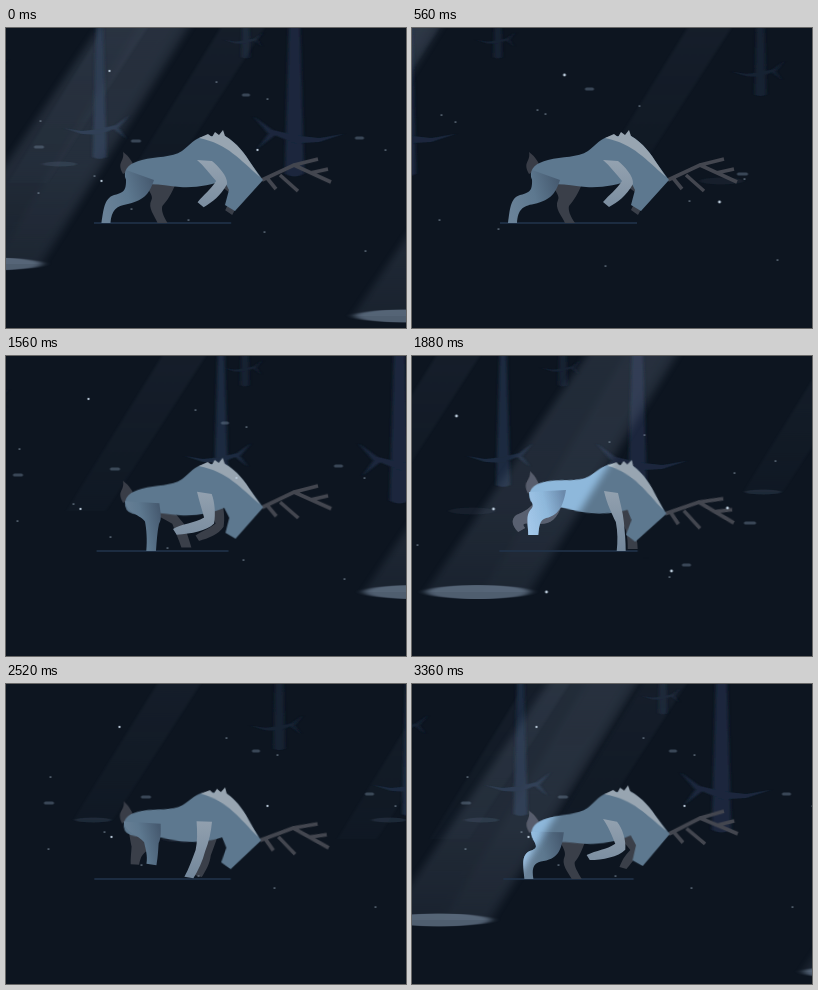
An HTML page without scripts for the animation above (3400 ms loop, 400 px wide and 300 px high).

```html
<!DOCTYPE html>
<html lang="en">
<head>
<meta charset="utf-8">
<title>Running stag</title>
<style>
html, body { margin: 0; width: 100%; height: 100%; overflow: hidden; background: #0d1520; }
svg { display: block; width: 100vw; height: 100vh; }

/* scenery: --v is the drift per 40 ms */
.go { animation: go 3.4s linear infinite; }
@keyframes go {
  0% { transform: translateX(0); }
  84.706% { transform: translateX(calc(var(--v) * -72px)); }
  98.824% { transform: translateX(calc(var(--v) * -82px)); }
  100% { transform: translateX(calc(var(--v) * -83px)); }
}
.puff { animation: puff 3.4s linear infinite; fill: none; stroke-linecap: round; }
@keyframes puff {
  0%, 5%, 95%, 100% { opacity: 1; }
  9.4%, 90.6% { opacity: 0; }
}
.s { stroke: #a9bacb; stroke-width: 1.7; opacity: .75; }
.l { stroke: #b9c9d8; stroke-width: 2.9; }
.d { stroke: #66788c; stroke-width: 3.2; opacity: .5; }

/* one stride */
.run { animation: .566667s linear infinite; }
.body { animation-name: rock; transform-origin: 200px 130px; }
@keyframes rock {
  0%, 98.8%, 100% { transform: rotate(0); }
  4.7% { transform: rotate(1.2deg); }
  8.2% { transform: rotate(3deg); }
  31.8% { transform: rotate(6deg); }
  50% { transform: rotate(4deg); }
  70% { transform: rotate(0); }
  88.2%, 92.9% { transform: rotate(-2deg); }
}
.line { animation-name: line; transform-origin: 156.5px 195px; }
@keyframes line {
  0%, 98.8%, 100% { transform: scaleX(1); }
  8.2% { transform: scaleX(1.08); }
  31.8% { transform: scaleX(1.01); }
  88.2%, 92.9% { transform: scaleX(.95); }
}
.nh { animation-name: nh; fill: url(#hind); }
@keyframes nh {
  0%, 98.8%, 100% { d: path("M120 142C120 160 122 164 108 167C98 170 98 182 96 195L105 195C106 182 110 178 122 176C140 172 144 164 148 152Z"); }
  4.7% { d: path("M119 145C120 155 118 164 110 170C100 178 88 186 81 195L90 195C96 186 104 182 118 176C134 170 140 162 148 152Z"); }
  8.2% { d: path("M122 145C120 155 118 164 106 167C94 172 88 180 80 189L86 193C94 186 98 180 110 177C126 174 134 164 146 152Z"); }
  31.8% { d: path("M117 136C118 146 124 148 118 154C113 160 116 170 116 179L126 179C127 170 127 164 134 162C148 160 152 146 154 134Z"); }
  50% { d: path("M118 138C120 150 136 152 146 160C150 168 152 172 150 180L160 182C162 172 162 166 160 158C158 152 156 148 155 142Z"); }
  70% { d: path("M119 144C122 156 138 158 148 165C154 174 154 184 152 195L162 195C164 184 164 174 162 164C160 158 156 152 154 147Z"); }
  88.2%, 92.9% { d: path("M119 148C121 160 130 163 118 167C109 171 112 184 113 195L122 195C120 184 122 178 132 177C148 174 150 164 152 148Z"); }
}
.fh { animation-name: fh; fill: #3a3f49; }
@keyframes fh {
  0%, 98.8%, 100% { d: path("M138 154C144 164 148 168 146 172C142 180 150 188 153 195L163 195C158 188 156 182 157 178C162 172 166 166 170 156Z"); }
  4.7% { d: path("M130 152C132 164 136 170 130 174C122 178 118 184 114 192L124 193C130 184 134 182 140 179C150 175 154 166 158 155Z"); }
  8.2% { d: path("M128 150C124 162 118 168 110 172C102 176 100 184 97 195L106 195C109 186 110 180 120 178C138 174 148 168 152 154Z"); }
  31.8% { d: path("M125 144C118 152 112 156 104 159C98 164 100 170 106 176L113 172C110 168 110 168 118 167C134 170 144 168 150 148Z"); }
  50% { d: path("M122 146C126 156 130 160 134 164C136 170 134 176 132 182L141 184C144 176 146 172 148 168C152 162 154 158 158 150Z"); }
  70% { d: path("M138 150C148 158 160 160 172 166C178 174 180 182 182 190L192 190C190 180 188 172 184 163C176 158 168 155 164 150Z"); }
  88.2%, 92.9% { d: path("M146 154C152 164 154 168 153 172C149 180 156 188 160 195L170 195C166 188 162 182 163 178C168 172 170 166 174 156Z"); }
}
.nf { animation-name: nf; fill: url(#fore); }
@keyframes nf {
  0%, 98.8%, 100% { d: path("M191 132C198 138 204 146 210 153C204 162 198 166 191 174L197 179C206 174 214 168 221 156C222 148 212 138 206 133Z"); }
  4.7% { d: path("M191 132C198 140 206 148 213 155C210 166 208 172 206 182L214 185C220 176 224 168 224 157C220 150 212 140 205 134Z"); }
  8.2% { d: path("M192 132C198 144 206 152 213 160C218 170 220 180 225 191L234 191C231 180 228 172 224 162C218 152 210 142 204 136Z"); }
  31.8% { d: path("M192 135C195 148 200 158 204 166C206 176 206 186 205 195L214 195C214 186 213 176 212 166C211 156 208 146 206 137Z"); }
  50% { d: path("M190 138C190 148 188 158 184 166C178 176 174 184 168 192L177 194C184 186 190 178 194 168C200 158 204 148 206 138Z"); }
  70% { d: path("M191 136C192 146 194 154 196 162C186 168 172 168 164 174L168 180C184 178 198 176 206 168C208 158 208 146 206 138Z"); }
  88.2%, 92.9% { d: path("M191 135C196 142 200 152 203 160C194 166 184 166 174 171L177 176C190 176 206 173 213 166C214 156 210 144 205 138Z"); }
}
.ff { animation-name: ff; fill: #3a3f49; }
@keyframes ff {
  0%, 98.8%, 100% { d: path("M205 150C212 156 220 162 226 166C224 172 222 176 219 182L226 187C230 180 232 176 234 168C232 160 224 152 220 148Z"); }
  8.2% { d: path("M205 150C212 160 218 168 222 174C224 180 226 186 228 193L236 192C234 186 232 178 230 170C226 160 222 152 218 148Z"); }
  31.8% { d: path("M200 150C206 160 212 168 214 174C216 182 216 188 216 193L226 193C226 186 224 178 222 170C218 160 218 154 216 148Z"); }
  50% { d: path("M196 150C194 160 190 166 188 172C184 180 180 186 176 190L184 193C190 186 196 180 198 172C204 164 208 156 212 148Z"); }
  70% { d: path("M200 150C202 158 204 162 206 168C198 174 190 174 182 178L184 185C196 183 208 180 214 172C216 162 216 156 216 148Z"); }
  88.2%, 92.9% { d: path("M203 150C208 156 214 160 218 166C212 172 210 176 207 183L214 185C218 180 222 176 226 168C226 160 222 152 218 148Z"); }
}
.lit { filter: brightness(1.53); }
</style>
</head>
<body>
<svg viewBox="0 0 400 300" preserveAspectRatio="none">
  <defs>
    <linearGradient id="shaft" x1="0" y1="0" x2="0" y2="1">
      <stop offset="0" stop-color="#93a3ba" stop-opacity=".17"/>
      <stop offset=".7" stop-color="#93a3ba" stop-opacity=".15"/>
      <stop offset="1" stop-color="#93a3ba" stop-opacity=".1"/>
    </linearGradient>
    <linearGradient id="glow" x1="0" y1="0" x2="0" y2="1">
      <stop offset=".82" stop-color="#fff"/>
      <stop offset=".97" stop-color="#fff" stop-opacity=".2"/>
    </linearGradient>
    <linearGradient id="faint" x1="0" y1="0" x2="0" y2="1">
      <stop offset="0" stop-color="#8fa3bd" stop-opacity=".07"/>
      <stop offset="1" stop-color="#8fa3bd" stop-opacity=".025"/>
    </linearGradient>
    <linearGradient id="bark" x1="0" y1="0" x2="1" y2="0">
      <stop offset="0" stop-color="#1b283a"/>
      <stop offset=".4" stop-color="#1a2738"/>
      <stop offset="1" stop-color="#1a2738" stop-opacity="0"/>
    </linearGradient>
    <linearGradient id="fore" gradientUnits="userSpaceOnUse" x1="0" y1="132" x2="0" y2="195">
      <stop offset="0" stop-color="#94a2b0"/>
      <stop offset="1" stop-color="#73879b"/>
    </linearGradient>
    <linearGradient id="hind" x1="0" y1=".6" x2="1" y2=".3">
      <stop offset="0" stop-color="#6a8298"/>
      <stop offset=".5" stop-color="#5d788f"/>
      <stop offset="1" stop-color="#465a70"/>
    </linearGradient>
    <filter id="soft" filterUnits="userSpaceOnUse" x="-20" y="-20" width="440" height="340"><feGaussianBlur stdDeviation="1.6 .7"/></filter>
    <filter id="wide" filterUnits="userSpaceOnUse" x="-20" y="-20" width="440" height="340"><feGaussianBlur stdDeviation="4.5 .5"/></filter>
    <filter id="haze" filterUnits="userSpaceOnUse" x="-40" y="-20" width="480" height="340"><feGaussianBlur stdDeviation="9 4"/></filter>

    <g id="beam">
      <path d="M-52 0L152-300H238L52 0Z"/>
      <path d="M5 0L186-300H226L45 0Z" opacity=".25"/>
    </g>
    <path id="ray" d="M-20 0L82-165H126L20 0Z"/>
    <g id="tree">
      <path d="M-3-300L-3.5-130L-7-3Q0 1 7-3L3.5-130L3-300Z"/>
      <path d="M0-25L-18-26L-36-32L-18-29L0-31L16-35L30-45L19-32L27-21L14-31Z"/>
    </g>
    <g id="shafts">
      <use href="#beam" x="-15" y="236"/>
      <use href="#beam" x="400" y="288"/>
      <use href="#beam" x="2088" y="236"/>
      <use href="#beam" x="2518" y="220"/>
      <use href="#beam" x="3554" y="236"/>
      <use href="#beam" x="3969" y="288"/>
    </g>
    <mask id="light" maskUnits="userSpaceOnUse" x="0" y="0" width="400" height="300">
      <g filter="url(#wide)"><g class="go" style="--v:43" fill="url(#glow)"><use href="#shafts"/></g></g>
    </mask>
    <g id="torso">
      <path d="M117 146C110 134 119 134 117 124C124 129 126 134 129 140Z" fill="#393d47"/>
      <path d="M256 152L288 137L325 154M288 137L312 131M304 145L322 141M261 150L270 161M274 147L292 163" fill="none" stroke="#43464f" stroke-width="3.6"/>
      <path d="M119 149C118 140 124 135 136 132C150 128 166 130 176 123C184 117 188 110 200 108L219 108C231 115 239 126 246 137L257 152L229 183L219 177L223 162L218 152C206 157 190 160 174 159C160 158 148 155 138 157Q121 160 119 149Z" fill="#5d788f"/>
      <path d="M193 110L202 106L206 109L209 104L213 107L217 102L219 108C231 115 239 126 246 137L254 149C234 132 222 116 193 110Z" fill="#98a5b1"/>
    </g>
    <g id="first">
      <path class="s" d="M89 148h0M35 93h0M126 181h0M211 54h0M262 71h0M259 204h0M183 192h0M33 165h0M380 122h0M360 223h0"/>
      <path class="l" d="M104 43h0M96 153h0M252 122h0" style="stroke-width:2.3"/>
      <path class="d" d="M127 113h7M30 119h7M238 67h5M351 110h6"/>
    </g>
  </defs>

  <rect width="400" height="300" fill="#0d1520"/>

  <!-- trees, far to near -->
  <g filter="url(#soft)">
    <g class="go" style="--v:11" fill="#142031">
      <use href="#tree" transform="translate(240 31) scale(.6)"/>
      <use href="#tree" transform="translate(668 31) scale(.6)"/>
      <use href="#tree" transform="translate(1153 31) scale(.6)"/>
    </g>
    <g class="go" style="--v:14.8" fill="#142133">
      <use href="#tree" transform="translate(-22 67) scale(.8)"/>
      <use href="#tree" transform="translate(556 69) scale(.8)"/>
      <use href="#tree" transform="translate(1206 67) scale(.8)"/>
    </g>
  </g>
  <g filter="url(#soft)"><g class="go" style="--v:16.5">
    <g fill="url(#faint)">
      <use href="#ray" x="22" y="155"/>
      <use href="#ray" x="139" y="155"/>
      <use href="#ray" x="431" y="155"/>
      <use href="#ray" x="724" y="155"/>
      <use href="#ray" x="1127" y="136"/>
      <use href="#ray" x="1391" y="155"/>
      <use href="#ray" x="1508" y="155"/>
    </g>
    <g fill="#2b3848" opacity=".6">
      <ellipse cx="54" cy="136" rx="17" ry="2.5"/>
      <ellipse cx="1127" cy="136" rx="18" ry="2.5"/>
      <ellipse cx="1423" cy="136" rx="17" ry="2.5"/>
      <g opacity=".5">
        <ellipse cx="541" cy="153" rx="22" ry="3.5"/>
        <ellipse cx="836" cy="155" rx="23" ry="3.5"/>
        <ellipse cx="1219" cy="155" rx="24" ry="3.5"/>
        <ellipse cx="1508" cy="155" rx="27" ry="3.5"/>
      </g>
    </g>
  </g></g>
  <g filter="url(#soft)">
    <g class="go" style="--v:15.5" fill="#1b2a3f">
      <use href="#tree" x="94" y="132"/>
      <use href="#tree" x="820" y="132"/>
      <use href="#tree" x="1380" y="133"/>
    </g>
    <g class="go" style="--v:21" fill="#1a283c">
      <use href="#tree" transform="translate(289 150) scale(-1.38 1.38)"/>
      <use href="#tree" transform="translate(1213 149) scale(-1.38 1.38)"/>
      <use href="#tree" transform="translate(2032 150) scale(-1.38 1.38)"/>
    </g>
  </g>

  <!-- light shafts and their pools -->
  <g filter="url(#wide)"><g class="go" style="--v:43">
    <g fill="url(#shaft)"><use href="#shafts"/></g>
    <g fill="#8da1b8" opacity=".52">
      <ellipse cx="-15" cy="236" rx="52" ry="6.5"/>
      <ellipse cx="400" cy="288" rx="50" ry="6.5"/>
      <ellipse cx="2088" cy="236" rx="52" ry="7"/>
      <ellipse cx="2518" cy="220" rx="54" ry="7"/>
      <ellipse cx="3554" cy="236" rx="52" ry="6.5"/>
      <ellipse cx="3969" cy="288" rx="50" ry="6.5"/>
    </g>
  </g></g>

  <path class="run line" d="M88 195H225" stroke="#22354c" stroke-width="1.5"/>

  <!-- stag in shade, then the same stag where light falls -->
  <g>
    <path class="run fh"/>
    <path class="run ff"/>
    <g class="run body"><use href="#torso"/></g>
    <path class="run nh"/>
    <path class="run nf"/>
  </g>
  <g mask="url(#light)"><g class="lit">
    <path class="run fh"/>
    <path class="run ff"/>
    <g class="run body"><use href="#torso"/></g>
    <path class="run nh"/>
    <path class="run nf"/>
  </g></g>

  <!-- drifting specks -->
  <g class="go" style="--v:21">
    <g class="puff"><use href="#first"/><use href="#first" x="1743"/></g>
    <g class="puff" style="animation-delay:-1.88s"><use href="#first" x="798"/></g>
    <g class="puff" style="animation-delay:-.86s"><use href="#first" x="1333"/></g>
    <g transform="translate(294)"><g class="puff" style="animation-delay:-2.84s">
      <path class="s" d="M126 82h0M134 86h0M30 87h0M44 94h0M28 192h0M87 201h0M194 238h0M278 173h0M333 151h0M366 232h0M228 78h0"/>
      <path class="l" d="M153 47h0M308 174h0"/>
      <path class="d" d="M175 61h6M327 146h8"/>
    </g></g>
    <g transform="translate(609)"><g class="puff" style="animation-delay:-2.24s">
      <path class="s" d="M125 91h0M125 121h0M9 183h0M17 187h0M358 176h0"/>
      <path class="l" d="M156 178h0M143 251h0" style="stroke-width:2.3"/>
      <path class="d" d="M137 97h6M6 161h6"/>
    </g></g>
    <g transform="translate(987)"><g class="puff" style="animation-delay:-1.52s">
      <path class="s" d="M198 86h0M233 79h0M6 189h0M258 221h0M323 117h0M364 105h0"/>
      <path class="l" d="M45 60h0M82 153h0M135 236h0M260 215h0M316 152h0"/>
      <path class="d" d="M334 167h9M272 209h6"/>
    </g></g>
    <g transform="translate(1155)"><g class="puff" style="animation-delay:-1.2s">
      <path class="s" d="M66 54h0M68 106h0M154 89h0M165 102h0M52 209h0M230 214h0M310 208h0M323 207h0M334 146h0M349 182h0"/>
      <path class="l" d="M27 119h0M58 227h0"/>
      <path class="d" d="M64 202h5M271 163h6"/>
    </g></g>
    <g transform="translate(1512)"><g class="puff" style="animation-delay:-.52s">
      <path class="s" d="M240 66h0M34 141h0M84 150h0M114 150h0M19 180h0M51 189h0M202 197h0M284 188h0"/>
      <path class="l" d="M390 113h0M176 174h0" style="stroke-width:2.4"/>
      <path class="d" d="M234 72h6"/>
    </g></g>
  </g>

  <!-- trees passing close by -->
  <g filter="url(#haze)"><g class="go" style="--v:90"><g transform="translate(2610)" fill="#1b283a" opacity=".88">
    <path d="M210 32C150 28 80 56 0 56L15 76C90 80 150 70 210 74Z"/>
    <path d="M-40 130C10 138 60 158 110 163C150 150 180 142 210 138V172C160 176 120 182 80 176C40 168 0 160-40 158Z"/>
    <path d="M210 182C150 184 90 194 35 214C90 222 150 212 210 208Z"/>
    <path d="M270 50C330 76 370 94 440 108V150C390 140 340 130 270 122Z"/>
  </g></g></g>
  <g class="go" style="--v:90"><g transform="translate(2610)">
    <rect x="203" y="-5" width="128" height="310" fill="url(#bark)"/>
    <rect x="-203" y="-5" width="60" height="310" fill="url(#bark)" opacity=".7" transform="scale(-1 1)"/>
    <rect x="-80" y="-5" width="112" height="310" fill="url(#bark)"/>
  </g></g>
</svg>
</body>
</html>
```
